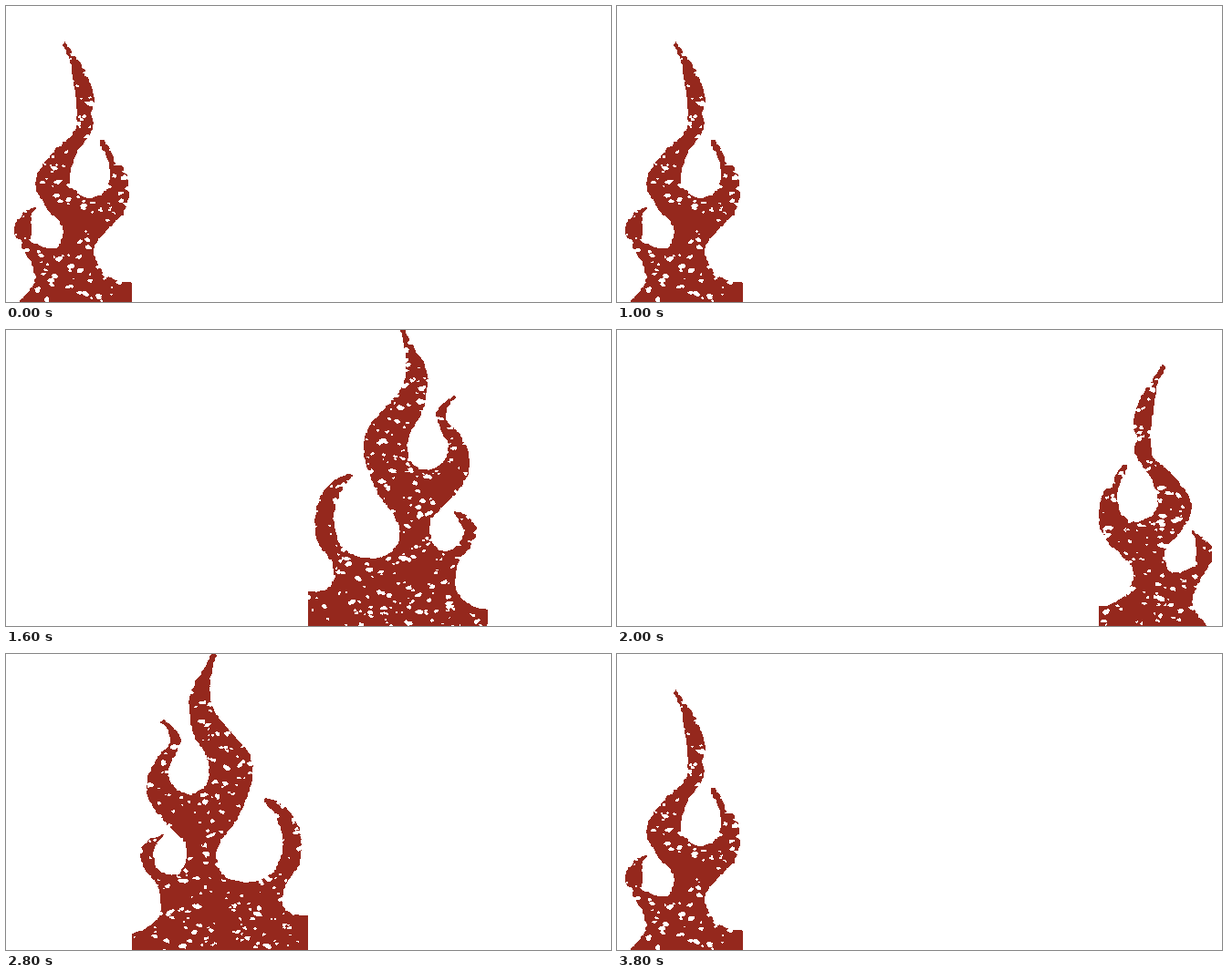
Write an HTML page that moves like this. It is 663 px wide and 325 px high and loops after 4000 ms.

```html
<!DOCTYPE html>
<html lang="en">
<head>
<meta charset="utf-8">
<title>Flames</title>
<style>
html, body { margin: 0; width: 100%; height: 100%; overflow: hidden; background: #fff; }
svg { display: block; }
</style>
</head>
<body>
<svg id="stage" width="663" height="325" viewBox="0 0 663 325" shape-rendering="crispEdges"></svg>
<script>
const NS = 'http://www.w3.org/2000/svg';
const RED = '#95281d', PAPER = '#fff';
const STEP = 200, MIRROR = 662;
// Which flame burns in each step of the loop
const ORDER = 'ABCDDACBCBDADCBADCBA';

// Key points of smooth strands; a slash marks a sharp corner.
const SMALL = `64,39 76,56 89,78 96,102 92,118 95,132 87,147 73,170 70,196 90,211 110,202 114,176 103,151 /
  105,147 114,158 119,174 / 128,177 134,202 127,228 97,262 103,289 122,302 140,303 / 140,328 / 13,328 /
  31,304 27,280 9,248 18,230 33,220 / 27,230 / 27,259 /
  44,266 58,264 62,242 46,223 34,202 35,185 51,162 74,140 78,120 75,88 70,58 61,41 64,39`;
const TALL = `230,-1 226,14 223,38 227,61 247,87 266,110 269,138 254,179 236,204 230,222 238,243 264,251
  293,240 304,208 296,178 284,162 / 285,158 306,169 321,193 321,230 305,254 303,277 314,287 /
  334,287 / 334,328 / 135,328 / 135,308 / 155,301 169,285 167,256 152,235 147,218 157,205 173,198 /
  161,217 166,236 183,243 196,232 197,208 178,188 159,164 155,140 166,114 180,98 177,82 169,74 /
  172,72 190,90 187,106 177,128 184,146 200,154 218,146 223,128 218,109 206,89 201,60 203,41 220,12 226,-1`;

const flames = {
  A: { shape: SMALL, left: 9, right: 138, specks: 280 },
  B: { shape: TALL, left: 138, right: 331, specks: 420 },
  C: { shape: TALL, left: 331, right: 528, specks: 560, flip: true },
  D: { shape: SMALL, left: 528, right: 652, specks: 320, flip: true }
};

function random(seed) {
  return () => {
    seed = (seed + 0x6D2B79F5) | 0;
    let t = Math.imul(seed ^ (seed >>> 15), 1 | seed);
    t = (t + Math.imul(t ^ (t >>> 7), 61 | t)) ^ t;
    return ((t ^ (t >>> 14)) >>> 0) / 4294967296;
  };
}

function node(name, attrs, parent) {
  const el = document.createElementNS(NS, name);
  for (const key in attrs) el.setAttribute(key, attrs[key]);
  return parent.appendChild(el);
}

const spline = (a, b, c, d, t) =>
  b + t * ((c - a) + t * (2 * a - 5 * b + 4 * c - d + t * (3 * (b - c) + d - a))) / 2;

const polygon = pts => 'M' + pts.map(p => p.map(Math.round).join(' ')).join('L') + 'Z';

// Sample the strands closely and nudge each sample for a worn edge.
function outline(shape, flip, rnd) {
  const pts = [];
  let corner = [];
  for (const strand of shape.split('/')) {
    const p = corner.concat(strand.trim().split(/\s+/).map(s => s.split(',').map(Number)));
    corner = p.slice(-1);
    for (let i = 0; i < p.length - 1; i++) {
      const a = p[Math.max(i - 1, 0)], b = p[i], c = p[i + 1], d = p[Math.min(i + 2, p.length - 1)];
      const n = Math.max(1, Math.round(Math.hypot(c[0] - b[0], c[1] - b[1]) / 2.5));
      for (let k = 0; k < n; k++) {
        const [x, y] = [0, 1].map(j => spline(a[j], b[j], c[j], d[j], k / n) + (rnd() - 0.5) * 1.6);
        pts.push([flip ? MIRROR - x : x, y]);
      }
    }
  }
  return polygon(pts);
}

// A small ragged blob, wider than tall and slightly tilted
function speck(x, y, rnd) {
  const r = 0.9 + 1.9 * rnd() ** 2, wide = 1 + rnd(), tilt = rnd() - 0.5;
  const pts = [];
  for (let i = 0; i < 8; i++) {
    const a = i * Math.PI / 4, k = r * (0.7 + rnd() * 0.6);
    const u = Math.cos(a) * k * wide, v = Math.sin(a) * k;
    pts.push([x + u - v * tilt, y + v + u * tilt]);
  }
  return polygon(pts);
}

const stage = document.getElementById('stage');
node('rect', { width: 663, height: 325, fill: PAPER }, stage);
const defs = node('defs', {}, stage);
const groups = {};

for (const id in flames) {
  const { shape, left, right, specks, flip } = flames[id];
  const rnd = random(left), width = right - left;
  const clip = node('clipPath', { id: 'clip' + id }, defs);
  node('rect', { x: left, y: 0, width, height: 325 }, clip);
  const g = groups[id] = node('g', { 'clip-path': `url(#clip${id})` }, stage);
  node('path', { d: outline(shape, flip, rnd), fill: RED, stroke: RED }, g);
  let holes = '';
  for (let i = 0; i < specks; i++) holes += speck(left + rnd() * width, 12 + rnd() * 313, rnd);
  node('path', { d: holes, fill: PAPER }, g);
}

function draw(time) {
  const lit = ORDER[Math.floor(time / STEP) % ORDER.length];
  for (const id in groups) groups[id].style.display = id === lit ? '' : 'none';
}

const start = performance.now();
function tick() {
  draw(performance.now() - start);
  requestAnimationFrame(tick);
}
tick();
</script>
</body>
</html>
```
